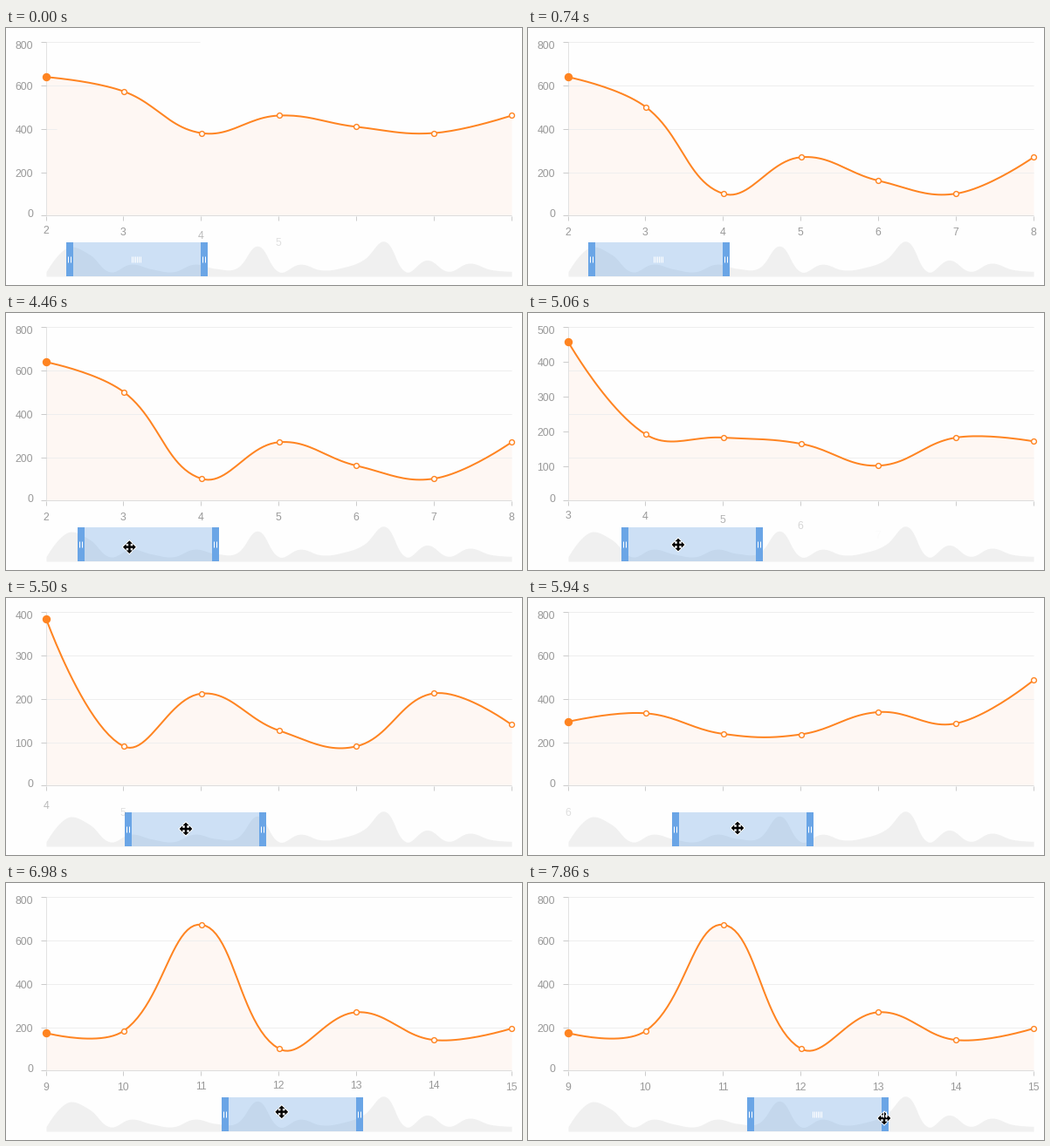
Write a matplotlib script that moves like this. It is 591x295 px and loops after 8 s.

```python
import matplotlib.pyplot as plt
import numpy as np
from matplotlib.animation import FuncAnimation

W, H, DPI = 591, 295, 100
PX = 72 / DPI
FRAMES, INTERVAL = 160, 50
STEPS = 54                       # distinct pictures per loop
STEP_MS = FRAMES * INTERVAL / STEPS

LEFT, RIGHT, TOP, BASE = 46, 579, 16, 215
ORANGE, BLUE, GREY = "#ff8421", "#6aa5e6", "#999999"

# One value per day, starting with day 1
VALUES = np.array([100, 638, 500, 100, 268, 160, 100, 268, 172, 182, 672, 100,
                   268, 140, 193, 370, 775, 100, 360, 110, 290, 150, 110])
VISIBLE, FIRST_DAY = 7, 2
XS = np.linspace(LEFT, RIGHT, VISIBLE)
AXES = {3: (500, 100), 4: (400, 100)}   # first day: (maximum, tick step)

MORPH, STAGGER = 450, 58
# Each time the chart moves on by one day
STARTS = [-222, 4800, 5375, 5662, 5876, 6059, 6242, 6462]

# Key points as (picture step, position)
WINDOW = np.array([(28, 73), (34, 111), (40, 169), (44, 239), (48, 255)])
CURSOR = np.array([(13, 11, 17), (16, 113, 224), (17, 113, 224), (19, 126, 270),
                   (28, 126, 270), (34, 172, 266), (40, 240, 264),
                   (44, 303, 259), (48, 320, 264), (52, 404, 270), (53, 408, 270)])
SPAN = 154
DRAG = range(29, 49)
HOVER = 18                       # the pointer becomes a move cursor


def ease(u):
    u = min(max(u, 0), 1)
    return 4 * u ** 3 if u < 0.5 else 1 - 4 * (1 - u) ** 3


def back_out(u):
    v = min(max(u, 0), 1) - 1
    return 1 + 2.7 * v ** 3 + 1.7 * v ** 2


def axis_for(day):
    return AXES.get(day, (800, 200))


def scale(values, top):
    return BASE - (BASE - TOP) * values / top


def target(day):
    return scale(VALUES[day - 1:day - 1 + VISIBLE], axis_for(day)[0])


def points_at(t):
    """Each move starts from wherever the interrupted morph had got to."""
    ys = np.full(VISIBLE, target(FIRST_DAY)[0])
    for i, (start, stop) in enumerate(zip(STARTS, STARTS[1:] + [np.inf])):
        if t >= start:
            progress = ease((min(t, stop) - start) / MORPH)
            ys = ys + (target(FIRST_DAY + i) - ys) * progress
    return ys


def smooth(xs, ys, n=24):
    """Bezier spline whose handles are shared out by neighbour distance."""
    p = np.column_stack([xs, ys])
    dist = np.hypot(*np.diff(p, axis=0).T)[:, None]
    share = dist[:-1] / (dist[:-1] + dist[1:])
    v = 0.4 * (p[2:] - p[:-2])
    before, after = p.copy(), p.copy()
    before[1:-1] -= v * share
    after[1:-1] += v * (1 - share)
    u = np.linspace(0, 1, n)[:, None, None]
    curve = ((1 - u)**3 * p[:-1] + 3 * u * (1 - u)**2 * after[:-1]
             + 3 * u**2 * (1 - u) * before[1:] + u**3 * p[1:])
    return curve.transpose(1, 0, 2).reshape(-1, 2).T


OVERVIEW = smooth(np.linspace(LEFT, RIGHT, len(VALUES)), 285 - VALUES * 40 / 775)

fig = plt.figure(figsize=(W / DPI, H / DPI), dpi=DPI, facecolor="#fefefe")
ax = fig.add_axes([0, 0, 1, 1])


def stroke(xs, ys, color, width=1):
    ax.plot(xs, ys, color=color, lw=width * PX, solid_capstyle="butt")


def box(x0, x1, color, alpha=1):
    ax.fill([x0, x1, x1, x0], [246, 246, 285, 285], color=color, alpha=alpha, lw=0)


def label(x, y, text, ha="center", alpha=1):
    ax.text(x, y + 4.7, text, ha=ha, va="baseline", color=GREY, alpha=alpha,
            family="Liberation Sans", size=12.2 * PX)


def dots(xs, ys, radius, fill):
    ax.plot(xs, ys, "o", ms=2 * radius * PX, mfc=fill, mec=ORANGE, mew=1.4 * PX)


def bars(center, count, gap):
    for i in range(count):
        x = center + (i - (count - 1) / 2) * gap
        stroke([x, x], [262, 269], "white")


def draw_axes(t, start, day):
    for i, y in enumerate(range(TOP, BASE, 50)):
        reach = ease((t - STARTS[0] - 26 - STAGGER * i) / MORPH)
        stroke([LEFT, LEFT + (RIGHT - LEFT) * reach], [y, y], "#eeeeee")
    stroke([LEFT, LEFT], [TOP, BASE], "#e2e2e2")
    stroke([LEFT, RIGHT], [BASE, BASE], "#dddddd")

    top, step = axis_for(day)
    for value in range(0, top + 1, step):
        y = np.ceil(scale(value, top))
        stroke([40, 46], [y, y], "#cccccc")
        label(31, min(max(y, 19), 212), str(value), "right")

    for i, x in enumerate(XS.astype(int)):
        stroke([x, x], [216, 221], "#cccccc")
        age = t - start - STAGGER * i
        if age > 0:
            label(x, 255 - 22 * back_out(age / MORPH), str(day + i),
                  alpha=min(age / 160, 1))


def draw_chart(ys):
    cx, cy = smooth(XS, ys)
    ax.fill_between(cx, cy, BASE, color="#ff7f40", alpha=0.055, lw=0)
    stroke(cx, cy, ORANGE, 2)
    dots(XS[1:], ys[1:], 2.9, "white")
    dots(XS[:1], ys[:1], 4, ORANGE)


def draw_slider(k):
    ax.fill_between(*OVERVIEW, 285, color="#f0f0f0", lw=0)
    x0 = np.interp(k, *WINDOW.T)
    x1 = x0 + SPAN
    box(x0, x1, "#6fa8e6", 0.34)
    for x in (x0, x1):
        box(x - 4, x + 4, BLUE)
        bars(x - 0.6, 2, 3)
    if k not in DRAG:
        bars((x0 + x1) / 2 - 0.6, 6, 2)


def draw_cursor(k):
    if k < CURSOR[0, 0]:
        return
    if k < HOVER:
        shape = np.array([(0, 0), (0, 16), (4, 12.5), (6.5, 18), (9, 17),
                          (6.5, 11.5), (11, 11.5)])
    else:
        arm = np.array([(-1, -1), (-1, -4), (-3, -4), (0, -7), (3, -4), (1, -4)])
        turn = np.array([(0, 1), (-1, 0)])
        shape = np.vstack([arm @ np.linalg.matrix_power(turn, n) for n in range(4)])
    steps, xs, ys = CURSOR.T
    px = shape[:, 0] + np.interp(k, steps, xs)
    py = shape[:, 1] + np.interp(k, steps, ys)
    ax.fill(px, py, fc="white", ec="white", lw=2.4 * PX)
    ax.fill(px, py, fc="black", ec="black", lw=0.5 * PX)


def update(frame):
    k = int((frame * INTERVAL + 45) / STEP_MS)
    t = k * STEP_MS
    moves = sum(start <= t for start in STARTS) - 1
    ax.clear()
    ax.set(xlim=(0, W), ylim=(H, 0))
    ax.axis("off")
    draw_axes(t, STARTS[moves], FIRST_DAY + moves)
    draw_chart(points_at(t))
    draw_slider(k)
    draw_cursor(k)
    return []


anim = FuncAnimation(fig, update, frames=FRAMES, interval=INTERVAL,
                     init_func=lambda: [], repeat=True, repeat_delay=0)
plt.show()
```
